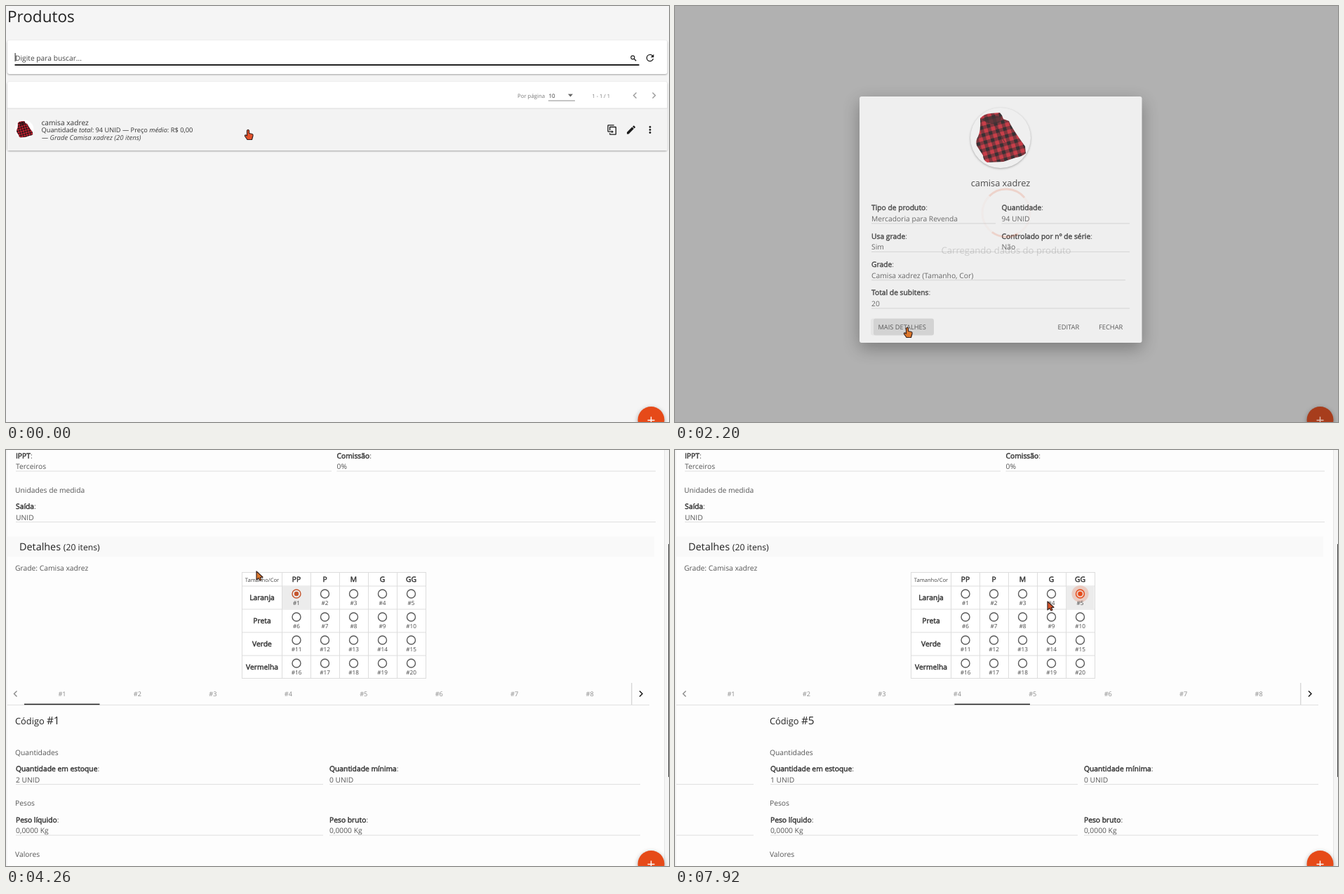
Write an HTML page that moves like this. It is 945 by 593 pixels and loops after 7990 ms.

```html
<!DOCTYPE html>
<html lang="pt-BR">
<head>
<meta charset="utf-8">
<title>Produtos</title>
<style>
html,body{margin:0;width:100%;height:100%;overflow:hidden;background:#f5f5f5}
svg{display:block;width:945px;height:593px}
text{font-family:"Open Sans","Noto Sans",sans-serif;text-rendering:geometricPrecision;white-space:pre}
.b{fill:#333;stroke:#333;stroke-width:.45}
.g{fill:#707070;stroke:#707070;stroke-width:.25}
.i{font-style:italic}
.card{fill:#fff;filter:drop-shadow(0 1px 1px rgba(0,0,0,.35))}
.modal{fill:#fff;filter:drop-shadow(0 8px 12px rgba(0,0,0,.38))}
.disc{fill:#fff;filter:drop-shadow(0 1.5px 1.5px rgba(0,0,0,.35))}
</style>
</head>
<body>
<svg id="stage" viewBox="0 0 945 593" xmlns="http://www.w3.org/2000/svg"></svg>
<script>
const LOOP = 7990, BODY = 10.3, DETAIL_Y = 268.5, PANE = 914, ACCENT = '#e64a19';

const text = (x, y, s, size = BODY, fill = '#555', extra = '') =>
  `<text x="${x}" y="${y}" font-size="${size}" fill="${fill}" ${extra}>${s}</text>`;
const mid = (x, y, s, size, fill, extra = '') => text(x, y, s, size, fill, 'text-anchor="middle" ' + extra);
const bold = s => `<tspan class="b">${s}</tspan>`;
const rect = (x, y, w, h, fill, extra = '') =>
  `<rect x="${x}" y="${y}" width="${w}" height="${h}" fill="${fill}" ${extra}/>`;
const hline = (x1, x2, y, fill = '#dedede') => rect(x1, y - .5, x2 - x1, 1, fill);
const path = (d, extra) => `<path d="${d}" ${extra}/>`;
const icon = (cx, cy, d, fill = '#1c1c1c') =>
  path(d, `fill="${fill}" transform="translate(${cx - 8} ${cy - 8}) scale(.667)"`);
const chevron = (x, y, dir, color) =>
  path(`M${x - 2 * dir} ${y - 4}l${4 * dir} 4l${-4 * dir} 4`, `fill="none" stroke="${color}" stroke-width="1.4"`);
const dots = (x, y) => [-4, 0, 4].map(d => `<circle cx="${x}" cy="${y + d}" r="1.4" fill="#222"/>`).join('');
const shirt = (x, y, k) => `<use href="#shirt" transform="translate(${x} ${y}) scale(${k})"/>`;
const group = (id, s, extra = '') => `<g id="${id}" ${extra}>${s}</g>`;
const field = (x, y, label, value, x2) =>
  text(x, y, bold(label) + ':') + text(x, y + 15.6, value) + hline(x, x2, y + 18.6);

const ICONS = {
  refresh: 'M17.65 6.35C16.2 4.9 14.21 4 12 4A8 8 0 0 0 4 12A8 8 0 0 0 12 20C15.73 20 18.84 17.45 19.73 14H17.65C16.83 16.33 14.61 18 12 18A6 6 0 0 1 12 6C13.66 6 15.14 6.69 16.22 7.78L13 11H20V4Z',
  copy: 'M11 17H4A2 2 0 0 1 2 15V3A2 2 0 0 1 4 1H16V3H4V15H11V13L15 16L11 19ZM19 21V7H8V13H6V7A2 2 0 0 1 8 5H19A2 2 0 0 1 21 7V21A2 2 0 0 1 19 23H8A2 2 0 0 1 6 21V19H8V21Z',
  pencil: 'M20.7 7C21.1 6.6 21.1 6 20.7 5.6L18.4 3.3C18 2.9 17.4 2.9 17 3.3L15.1 5.1L18.9 8.9ZM3 17.25V21H6.75L17.8 9.9L14.06 6.18Z'
};

const defs = `<defs>
  <pattern id="plaid" width="10.5" height="10.5" patternUnits="userSpaceOnUse" patternTransform="rotate(-16)">
    <rect width="10.5" height="10.5" fill="#cf2230"/>
    <path d="M0 0H10.500V5H0ZM0 0H5V10.500H0Z" fill="#3a1219" opacity=".6"/><rect width="5" height="5" fill="#1b1216"/>
  </pattern>
  <g id="shirt">
    <path d="M7 8Q12 2 22 1L35 0Q39 4 40 9L48 12Q52 22 71 48L72 58Q66 63 58 64L40 70L17 71Q11 68 11 61L2 47Q0 40 4 34Q8 26 7 8Z" fill="url(#plaid)"/>
    <path d="M10 10Q20 4 36 6L35 13Q28 18 18 14ZM27 15L42 42" fill="#2a1518" stroke="#2a1518" opacity=".75"/>
  </g>
  <clipPath id="window"><rect x="2" y="364" width="915" height="400"/></clipPath>
</defs>`;

function listPage() {
  return text(2, 22.6, 'Produtos', 22.5, '#212121') +
    rect(2, 49, 940.5, 48, '#fff', 'rx="3" class="card"') +
    `<text id="hint" x="13" y="77.5" font-size="10.25">Digite para buscar...</text>` +
    rect(12.5, 83, 890, 1, '#888', 'id="underline"') + rect(12.6, 67, 1, 12, '#222', 'id="caret"') +
    '<circle cx="893.3" cy="73.3" r="2.5" fill="none" stroke="#222" stroke-width="1.2"/>' +
    path('M895.2 75.2L898.2 78.2', 'stroke="#222" stroke-width="1.4"') +
    icon(918, 74, ICONS.refresh) +
    rect(2, 108, 940.5, 98, '#fff', 'rx="3" class="card"') +
    rect(2, 146, 940.5, 60, '#f3f3f3', 'id="row"') + hline(2, 942.5, 146, '#dcdcdc') +
    text(729, 130.5, 'Por página', 7.8, '#777') + text(773.5, 130.5, '10', 8, '#333') +
    path('M801 125.5h7l-3.5 4z', 'fill="#666"') + hline(773, 811, 135, '#8c8c8c') +
    text(835.5, 130.5, '1 - 1 / 1', 7.4, '#777') +
    chevron(896.5, 127.5, -1, '#999') + chevron(923.5, 127.5, 1, '#999') +
    '<circle cx="26" cy="176" r="13.4" fill="#fff"/>' + shirt(14.5, 164, .33) +
    text(50.5, 169.7, 'camisa xadrez', 10.2, '#333') +
    text(50.5, 180.2, 'Quantidade <tspan class="i">total</tspan>: 94 UNID — Preço <tspan class="i">médio</tspan>: R$ 0,00', 9.25, '#333') +
    text(51, 191, '— Grade Camisa xadrez (20 itens)', 9.5, '#444', 'class="i"') +
    group('actions', icon(864, 176.5, ICONS.copy) + icon(891, 176.5, ICONS.pencil) + dots(918, 176.5));
}

function modal() {
  return rect(263, 129, 402.5, 351, '#fff', 'rx="3" class="modal"') +
    '<circle cx="464" cy="188" r="43" class="disc"/>' + shirt(428, 152, 1) +
    mid(464, 256.5, 'camisa xadrez', 12.8, '#333') +
    field(280, 291.4, 'Tipo de produto', 'Mercadoria para Revenda', 457) +
    field(465.5, 291.4, 'Quantidade', '94 UNID', 648) +
    field(280, 331.8, 'Usa grade', 'Sim', 457) +
    field(465.5, 331.8, 'Controlado por nº de série', 'Não', 648) +
    field(280, 372.1, 'Grade', 'Camisa xadrez (Tamanho, Cor)', 642) +
    field(280, 412.4, 'Total de subitens', '20', 648) +
    rect(279, 445.5, 90, 24, '#000', 'id="hover" rx="3" opacity=".05"') +
    rect(283, 445.5, 86, 24, '#000', 'id="press" rx="3" opacity=".09"') +
    text(289.5, 460.8, 'MAIS DETALHES', 9.25, '#444') +
    text(545.5, 460.8, 'EDITAR', 9.3, '#444') + text(604, 460.8, 'FECHAR', 9.3, '#444');
}

function loader() {
  return `<g id="spin" fill="none" stroke="${ACCENT}" stroke-width="3">` +
    '<circle cx="472" cy="295" r="34" opacity=".12"/>' +
    path('M448 271A34 34 0 0 1 498 273M489 324.500A34 34 0 0 1 452 322.500', 'opacity=".6"') + '</g>' +
    mid(472, 352.5, 'Carregando dados do produto', 13.1, '#666');
}

const COLS = [414, 454.5, 495.5, 536.5, 577.5];
const radio = (x, y, color) => `<circle cx="${x}" cy="${y}" r="6" fill="none" stroke="${color}" stroke-width="1.4"/>`;

function grid() {
  let s = rect(336.5, 174.5, 262, 151, '#fff') + mid(365, 187.5, 'Tamanho/Cor', 7.6, '#444');
  for (const y of [174.5, 194, 227, 260, 293, 325.5]) s += hline(336, 599, y, '#ddd');
  for (const x of [336.5, 393.5, 434.5, 475.5, 516.5, 557.5, 598.5]) s += rect(x - .5, 174, 1, 152, '#ddd');
  ['PP', 'P', 'M', 'G', 'GG'].forEach((n, c) => s += mid(COLS[c], 188.2, n, BODY, '#333', 'class="b"'));
  ['Laranja', 'Preta', 'Verde', 'Vermelha'].forEach((n, r) => {
    s += mid(365, 214.3 + 33 * r, n, BODY, '#333', 'class="b"');
    COLS.forEach((x, c) => s += radio(x, 205 + 33 * r, '#5a5a5a') + mid(x, 221 + 33 * r, '#' + (r * 5 + c + 1), 8.2, '#444'));
  });
  return s + group('pick', rect(394, 194.5, 40, 32, '#ececec') +
    `<circle id="halo" cx="414" cy="205" r="12" fill="${ACCENT}"/>` +
    `<g id="dot">${radio(414, 205, 'currentColor')}<circle cx="414" cy="205" r="3.2" fill="currentColor"/></g>` +
    `<text id="num" x="414" y="221" font-size="8.2" fill="#444" text-anchor="middle"></text>`);
}

const pane = (id, n, stock) => group(id,
  text(13, 390.5, `Código <tspan font-size="15.3">#${n}</tspan>`, 12.8, '#222') +
  text(13, 434.7, 'Quantidades') +
  field(14, 458, 'Quantidade em estoque', stock + ' UNID', 452) + field(461, 458, 'Quantidade mínima', '0 UNID', 904) +
  text(13, 507.2, 'Pesos') +
  field(14, 530.5, 'Peso líquido', '0,0000 Kg', 452) + field(461, 530.5, 'Peso bruto', '0,0000 Kg', 904) +
  text(13, 579.7, 'Valores'));

function subitems() {
  let s = grid() + hline(2, 917, 363.5, '#e0e0e0');
  for (let i = 0; i < 8; i++) s += mid(80 + 107.45 * i, 350.5, '#' + (i + 1), 9.2, '#8a8a8a');
  return s + rect(26, 361.7, 107.5, 1.5, '#222', 'id="slider"') +
    chevron(13.5, 347.5, -1, '#888') +
    rect(891, 332, 1, 31, '#d9d9d9') + rect(892, 332, 1, 31, '#ececec') + chevron(905, 347.5, 1, '#111') +
    `<g clip-path="url(#window)">${pane('oldPane', 1, 2)}${pane('newPane', 5, 1)}</g>`;
}

const stamp = (y, verb, when) =>
  mid(175.5, y, `${verb} em <tspan class="g">${when}</tspan>`, 8.4, '#8a8a8a') +
  mid(175.5, y + 9.5, 'por <tspan class="g">Juliana</tspan>', 8.4, '#8a8a8a');
const section = (y, s) => rect(2, y, 922, 28.5, '#f9f9f9') + text(19, y + 19.3, s, 14.4, '#222');

function productPage() {
  return rect(2, 0, 936, 110, '#fafafa') +
    '<circle cx="56" cy="56" r="43" class="disc"/>' + shirt(20, 20, 1) +
    text(109.5, 26.3, 'camisa xadrez <tspan font-size="12.75">(Grade Camisa xadrez)</tspan>', 15.3, '#222', 'class="b"') +
    text(109.5, 49, 'Código: 1', 12.2, '#444', 'class="b"') +
    stamp(67.2, 'Cadastrado', '18/03/2022 16:59') + stamp(88.6, 'Alterado', '21/03/2022 08:43') +
    dots(914, 25.5) + hline(2, 938, 110.5, '#e0e0e0') +
    mid(416.5, 130.3, 'Identificação', 9.2, '#8a8a8a') + mid(523.7, 130.3, 'Movimentos', 9.1, '#999') +
    hline(2, 938, 143.5, '#e0e0e0') + rect(363, 141.7, 107, 1.5, '#222') +
    text(12.5, 168, bold('Status') + ': Ativo') + text(314.5, 168, bold('Controle') + ': Grade') +
    text(616.5, 168, bold('Tipo') + ': Mercadoria para Revenda') +
    section(190, 'Dados do produto') +
    field(14, 240, 'Nome', 'camisa xadrez', 921) +
    field(14, 280, 'IPPT', 'Terceiros', 464) + field(471.5, 280, 'Comissão', '0%', 926) +
    text(13, 329, 'Unidades de medida') + field(14, 352.6, 'Saída', 'UNID', 926) +
    section(391.8, 'Detalhes <tspan font-size="12.2">(20 itens)</tspan>') +
    text(13, 440.7, 'Grade: Camisa xadrez') +
    `<g transform="translate(0 ${DETAIL_Y})">${subitems()}</g>`;
}

const stage = document.getElementById('stage');
stage.innerHTML = defs + rect(0, 0, 945, 593, '#f5f5f5') +
  group('list', listPage()) +
  group('product', rect(2, 0, 936, 593, '#fdfdfd') + rect(938, 0, 1, 593, '#e6e6e6') +
    group('scroller', productPage()) + rect(944, -9, 1, 332, '#444', 'id="thumb"')) +
  rect(0, 0, 945, 593, '#212121', 'id="shade"') +
  group('fab', '<circle cx="919.5" cy="590" r="19" style="filter:drop-shadow(0 2px 3px rgba(0,0,0,.35))"/>' +
    path('M914.500 590.500h10M919.500 585.500v10', 'id="plus" stroke="#fff" stroke-width="1.4"')) +
  group('modal', modal()) + group('loader', loader()) +
  group('cursor',
    path('M0 0V12L3 9.500L5 13L7 12L5.300 8.700L9 8.300Z', 'id="arrow"') +
    path('M-1.500 1.500Q0 -1 1.500 1.500V5.500L6 6.500Q7.500 7 7 9L5.500 14.500H-1L-4.500 9.500Q-5 7.500 -3 8L-1.500 9Z', 'id="hand"'),
    'stroke="#3a2420" stroke-width="1.2" stroke-linejoin="round"');

const el = {};
stage.querySelectorAll('[id]').forEach(n => el[n.id] = n);
const set = (id, name, v) => el[id].setAttribute(name, v);
const show = (id, on) => set(id, 'visibility', on ? 'inherit' : 'hidden');
const move = (id, x, y = 0) => set(id, 'transform', `translate(${x} ${y})`);

const clamp = v => Math.max(0, Math.min(1, v));
const smooth = p => p * p * (3 - 2 * p);
function bezier(x1, y1, x2, y2) {
  const at = (a, b, s) => 3 * (1 - s) * (1 - s) * s * a + 3 * (1 - s) * s * s * b + s * s * s;
  return p => {
    let lo = 0, hi = 1;
    for (let i = 0; i < 20; i++) {
      const m = (lo + hi) / 2;
      if (at(x1, x2, m) < p) lo = m; else hi = m;
    }
    return at(y1, y2, (lo + hi) / 2);
  };
}
const swift = bezier(.25, .8, .5, 1), pop = bezier(.25, .8, .25, 1);
const span = (t, start, length) => clamp((t - start) / length);
const mix = (a, b, p) => a + (b - a) * p;

// time, x, y of the pointer tip
const POINTER = [
  [0, 345, 176], [590, 346, 176], [900, 346, 177], [1365, 352, 356], [1800, 334, 467], [2100, 331, 458],
  [2600, 331, 458], [3000, 323, 446], [3450, 323, 446], [4200, 357, 173], [4280, 357, 173], [4640, 555, 209],
  [5410, 39, 447], [5480, 39, 447], [5620, 25, 462], [5950, 25, 462], [6130, 40, 500], [6450, 694, 345],
  [6690, 616, 257], [6880, 600, 217], [7080, 577, 203], [7700, 577, 203], [7920, 531, 216], [LOOP, 525, 218]
];
function pointerAt(t) {
  const i = Math.max(1, POINTER.findIndex(k => k[0] > t));
  const a = POINTER[i - 1], b = POINTER[i], p = smooth(span(t, a[0], b[0] - a[0]));
  return [mix(a[1], b[1], p), mix(a[2], b[2], p)];
}

function render(t) {
  const opened = t >= 590, onList = t < 2200, onProduct = t >= 2900;
  show('list', onList);
  show('caret', t < 70);
  show('row', onList && !opened);
  show('actions', onList && !opened);
  set('hint', 'fill', opened ? '#707070' : '#444');
  set('underline', 'height', opened ? 1 : 2);
  set('underline', 'fill', opened ? '#8a8a8a' : '#222');

  const enter = pop(span(t, 588, 300)), leave = swift(span(t, 2205, 220));
  const scale = onList ? mix(.5, 1, enter) : 1 - .4 * leave;
  const alpha = onList ? .46 * swift(span(t, 681, 300)) : .32 * (1 - leave);
  set('modal', 'opacity', onList ? enter * enter : .8 * (1 - leave));
  set('modal', 'transform', `translate(464 304.6) scale(${scale}) translate(-464 -304.6)`);
  show('modal', t > 590 && leave < 1);
  show('hover', t > 1720 && leave < 1);
  show('press', t > 2140 && leave < 1);
  set('shade', 'opacity', alpha);
  const dim = [230, 74, 25].map(c => Math.round(mix(c, 33, alpha)));
  set('fab', 'fill', t > 640 && t < 1365 ? '#d6342e' : `rgb(${dim})`);
  set('plus', 'opacity', 1 - alpha);

  show('loader', !onList && !onProduct);
  set('loader', 'opacity', .25 + .75 * span(t, 2210, 200));
  set('spin', 'transform', `rotate(${(t - 2200) * .257} 472 295)`);

  show('product', onProduct);
  const scroll = DETAIL_Y * smooth(span(t, 3450, 700));
  move('scroller', 0, -scroll);
  move('thumb', 0, scroll * .533);

  const picked = t >= 7580, slide = swift(span(t, 7775, 300));
  move('pick', picked ? 163.5 : 0);
  el.num.textContent = picked ? '#5' : '#1';
  set('halo', 'opacity', picked ? .2 : 0);
  set('dot', 'color', picked || t < 3800 ? ACCENT : '#c4562f');
  move('slider', 429.8 * slide);
  move('oldPane', -PANE * slide);
  move('newPane', PANE * (1 - slide));

  const hand = !opened || (t > 1760 && t < 2600) || (t > 7040 && t < 7740);
  show('hand', hand);
  show('arrow', !hand);
  move('cursor', ...pointerAt(t));
  set('cursor', 'fill', t < 2200 ? '#e5522b' : t < 7560 ? '#de782c' : '#d8542a');
}

const start = performance.now();
(function tick() {
  render((performance.now() - start) % LOOP);
  requestAnimationFrame(tick);
})();
</script>
</body>
</html>
```
